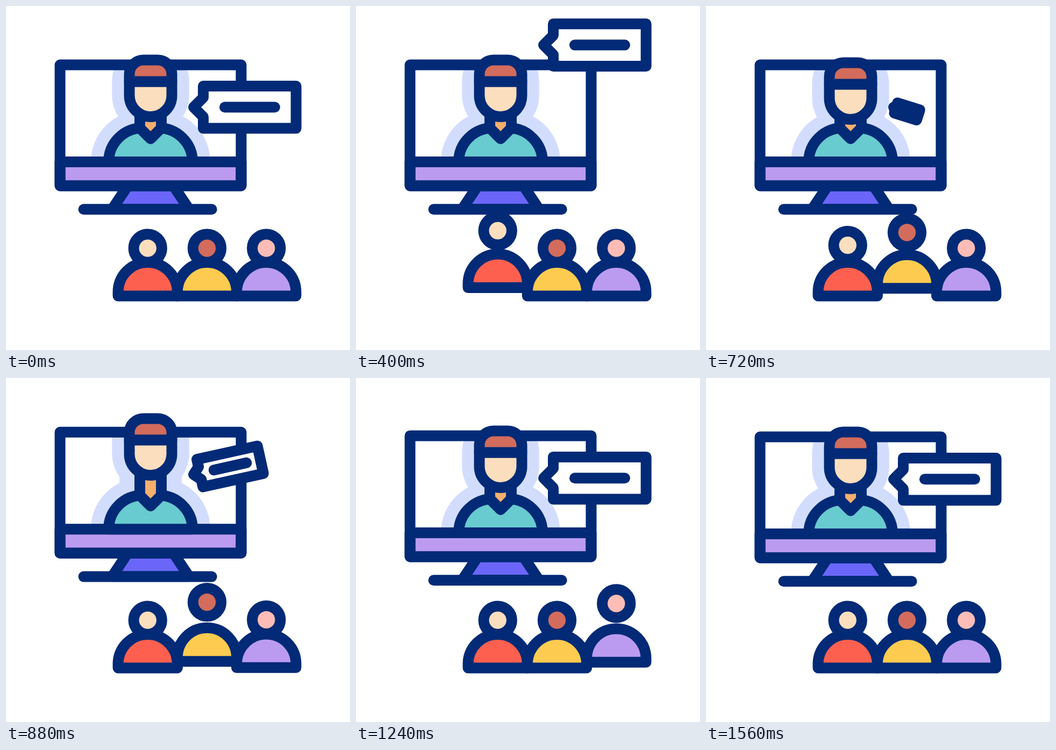
Animation of 640 by 640 pixels, one loop 1.68 s. Source, as an HTML page:

```html
<!DOCTYPE html>
<html lang="en">
<head>
<meta charset="utf-8">
<title>Online lecture</title>
<style>
  html, body { margin: 0; width: 100%; height: 100%; overflow: hidden; background: #fff; }
  svg { display: block; width: 100vw; height: 100vh; }
  .ink { stroke: #032a76; stroke-width: 20; stroke-linecap: round; stroke-linejoin: round; }
</style>
</head>
<body>
<svg viewBox="0 0 640 640" fill="none">
  <defs>
    <clipPath id="screen"><rect x="105" y="114" width="328" height="176"/></clipPath>
  </defs>
  <g id="monitor">
    <g class="ink">
      <path d="M226.5 334.5 L197.5 378 H340.5 L311.5 334.5Z" fill="#6b66f9"/>
      <path d="M144.5 378.3 H382.7"/>
    </g>
    <rect x="100.5" y="109.5" width="337" height="225" fill="#fff"/>
    <g clip-path="url(#screen)" fill="#d2ddfe">
      <rect x="158" y="194.5" width="222" height="200" rx="95"/>
      <rect x="211" y="170" width="116" height="60"/>
      <rect id="halo" x="197.3" y="68" width="143.4" height="170.2" rx="71.7"/>
    </g>
    <g class="ink">
      <rect x="100.5" y="290" width="337" height="44.5" fill="#ba9bf0"/>
      <rect x="100.5" y="109.5" width="337" height="225"/>
      <path d="M191 290 A63 63 0 0 1 254 227 H284 A63 63 0 0 1 347 290Z" fill="#68cbcf"/>
      <path d="M249 170 V227 L269 247 L289 227 V170" fill="#f6af6e"/>
      <g id="head">
        <path d="M229.5 126.5 a26 26 0 0 1 26 -26 H282.5 a26 26 0 0 1 26 26 V140.7 H229.5Z" fill="#d36c5c"/>
        <path d="M229.5 140.7 H308.5 V166.5 a39.5 39.5 0 0 1 -79 0Z" fill="#fbdebd"/>
      </g>
    </g>
  </g>
  <g id="crowd" class="ink"></g>
  <g class="ink">
    <path id="box" fill="#fff"/>
    <path id="dash"/>
  </g>
</svg>
<script>
const LOOP = 1680, STEP = 40;
const $ = id => document.getElementById(id);
const shift = (el, y) => el.setAttribute('transform', `translate(0 ${y.toFixed(2)})`);

// Progress from 0 to 1 between two times: linear, then eased at both ends
const span = (t, a, b) => Math.min(1, Math.max(0, (t - a) / (b - a)));
const ease = (t, a, b) => (1 - Math.cos(Math.PI * span(t, a, b))) / 2;
// Rise from 0 to 1 and back again
const hop = (t, from, peak, to) => ease(t, from, peak) - ease(t, peak, to);

const monitorY = t => -17 * hop(t, 720, 1035, 1300);
const headY = t => 5 * hop(t, 640, 720, 800) - 18.5 * hop(t, 720, 925, 1140);
const bodyHop = t => -16.5 * hop(t, 160, 447, 715);
const faceHop = t => -22 * hop(t, 180, 500, 830);

// Audience: one after another, evenly spaced
const people = [['#fbdebd', '#fe604f'], ['#d36c5c', '#fdcb50'], ['#fdbdb6', '#ba9bf0']]
  .map(([skin, shirt], i) => ({ skin, shirt, x: 263.7 + 110.3 * i, delay: 342 * i }));
$('crowd').innerHTML = people.map(p => `<g>
  <path d="M${p.x - 55.2} 539.5 V532.2 a55.2 55.2 0 0 1 110.4 0 V539.5Z" fill="${p.shirt}"/>
  <circle cx="${p.x}" cy="450.6" r="26.2" fill="${p.skin}"/></g>`).join('');
people.forEach((p, i) => [p.body, p.face] = $('crowd').children[i].children);

// Bubble outline relative to its tip; the line weight stays fixed while it grows
const TIP = { x: 349, y: 188.3 };
const upper = [[18, -18], [18, -39.3], [190.7, -39.3]];
const lower = upper.map(([x, y]) => [x, -y]).reverse();
const outline = [[0, 0], ...upper, ...lower];
const dashLine = [[58, 0], [151, 0]];

function place(points, scale, deg, y) {
  const a = deg * Math.PI / 180, c = Math.cos(a) * scale, s = Math.sin(a) * scale;
  return 'M' + points.map(([px, py]) =>
    (TIP.x + px * c - py * s).toFixed(2) + ' ' + (TIP.y + y + px * s + py * c).toFixed(2)).join('L');
}

function drawBubble(t) {
  let scale = 1, turn = 0, y;
  if (t < 645) {
    y = -243 * ease(t, 160, 655);
  } else {
    scale = 1 - (1 - span(t, 645, 1200)) ** 2;
    turn = 25 * (1 - ease(t, 640, 915)) - 14 * hop(t, 640, 915, 1240);
    y = monitorY(t);
  }
  $('box').setAttribute('d', place(outline, scale, turn, y) + 'Z');
  $('dash').setAttribute('d', place(dashLine, scale, turn, y));
}

function draw(t) {
  shift($('monitor'), monitorY(t));
  shift($('head'), headY(t));
  shift($('halo'), headY(t));
  drawBubble(t);
  for (const p of people) {
    const own = t - p.delay;
    shift(p.body, bodyHop(own));
    shift(p.face, bodyHop(own) + faceHop(own));
  }
}

const start = performance.now();
function tick() {
  const t = (performance.now() - start) % LOOP;
  draw(Math.floor(t / STEP) * STEP);
  requestAnimationFrame(tick);
}
tick();
</script>
</body>
</html>
```
